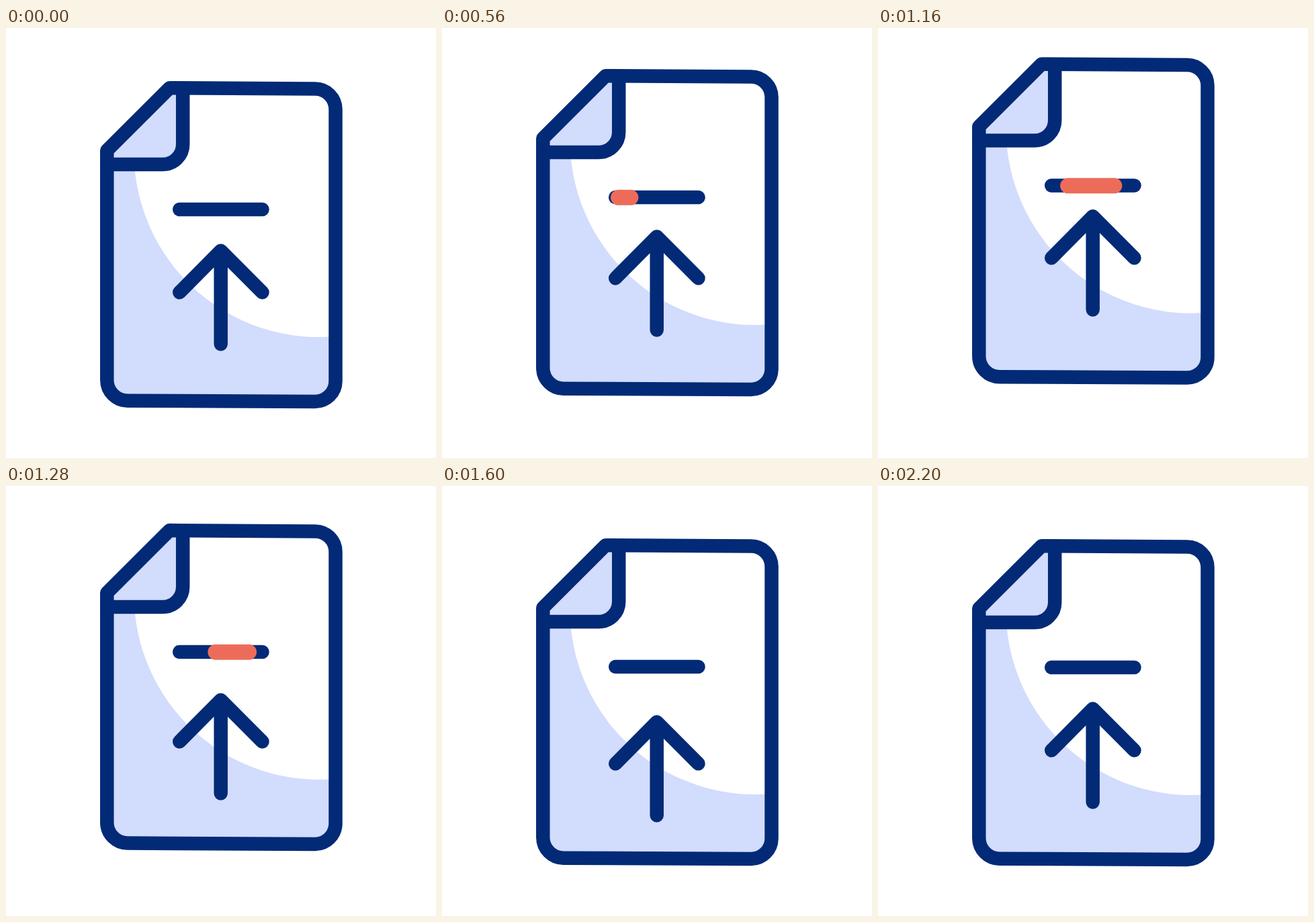
Recreate the animation shown at these times as an HTML page. Size 640 px wide and 640 px high, loop 2400 ms.

```html
<!DOCTYPE html>
<html lang="en">
<head>
<meta charset="utf-8">
<title>Upload file</title>
<style>
  html, body { margin: 0; width: 100%; height: 100%; overflow: hidden; background: #fff; }
  svg { display: block; width: 100%; height: 100%; }
  .ink { fill: none; stroke: #032a76; stroke-width: 20.5; stroke-linecap: round; stroke-linejoin: round; }
  .tint { fill: #d2dcfd; }
  #spark { fill: none; stroke: #ed6c59; stroke-width: 23; stroke-linecap: round; }
</style>
</head>
<body>
<svg viewBox="0 0 640 640">
  <g id="page">
    <path class="tint" d="M150.3 203H191.1A275.5 275.5 0 0 0 490.5 459V525.5A30.5 30.5 0 0 1 460 556L181 554.7A30.7 30.7 0 0 1 150.3 524Z"/>
    <path class="tint" d="M150.3 182L243.5 89H263V173A30 30 0 0 1 233 203H150.3Z"/>
    <path class="ink" d="M263.2 90V173A30 30 0 0 1 233.2 203.1H150.3"/>
    <path class="ink" d="M150.3 182.2L243.5 89.2L460 90.5A30.5 30.5 0 0 1 490.5 121V525.5A30.5 30.5 0 0 1 460 556L181 554.7A30.7 30.7 0 0 1 150.3 524Z"/>
    <path class="ink" d="M258.2 270H381.5"/>
    <path id="spark"/>
  </g>
  <path id="arrow" class="ink" d="M258.2 393.5L319.7 331.5L381.5 393.5M319.7 331.5V470.5"/>
</svg>
<script>
const LOOP = 2400, STEP = 40;
const LINE_START = 258, LINE_END = 381.5;
const page = document.getElementById('page');
const arrow = document.getElementById('arrow');
const spark = document.getElementById('spark');

const curve = (a, b, s) => 3 * a * s * (1 - s) ** 2 + 3 * b * s * s * (1 - s) + s ** 3;

// Eased progress for a cubic-bezier(x1, 0, x2, 1), solved by bisection.
function bezier(x, x1, x2) {
  let low = 0, high = 1;
  for (let i = 0; i < 30; i++) {
    const mid = (low + high) / 2;
    if (curve(x1, x2, mid) < x) low = mid; else high = mid;
  }
  return curve(0, 1, low);
}

// Each move: [start ms, end ms, destination, x1, x2]
function track(t, value, moves) {
  for (const [start, end, to, x1 = 1 / 3, x2 = 2 / 3] of moves) {
    if (t <= start) break;
    value += (to - value) * (t >= end ? 1 : bezier((t - start) / (end - start), x1, x2));
  }
  return value;
}

function draw(t) {
  const pageY = track(t, 0, [[267, 880, -38.6], [1030, 1733, 0, .45, .27]]);
  const arrowY = track(t, 0, [[360, 880, -64], [1068, 1446, 22.2], [1446, 2200, 0]]);
  const tail = track(t, LINE_START, [[400, 880, 275.3], [1078, 1590, LINE_END]]);
  const head = track(t, LINE_START, [[400, 880, 346.5], [1015, 1600, LINE_END]]);
  page.setAttribute('transform', `translate(0 ${pageY})`);
  arrow.setAttribute('transform', `translate(0 ${arrowY})`);
  spark.setAttribute('d', `M${tail} 270.3H${head}`);
  spark.style.display = t > 400 && t < 1590 ? '' : 'none';
}

function tick() {
  draw(Math.floor(performance.now() % LOOP / STEP) * STEP);
  requestAnimationFrame(tick);
}
tick();
</script>
</body>
</html>
```
